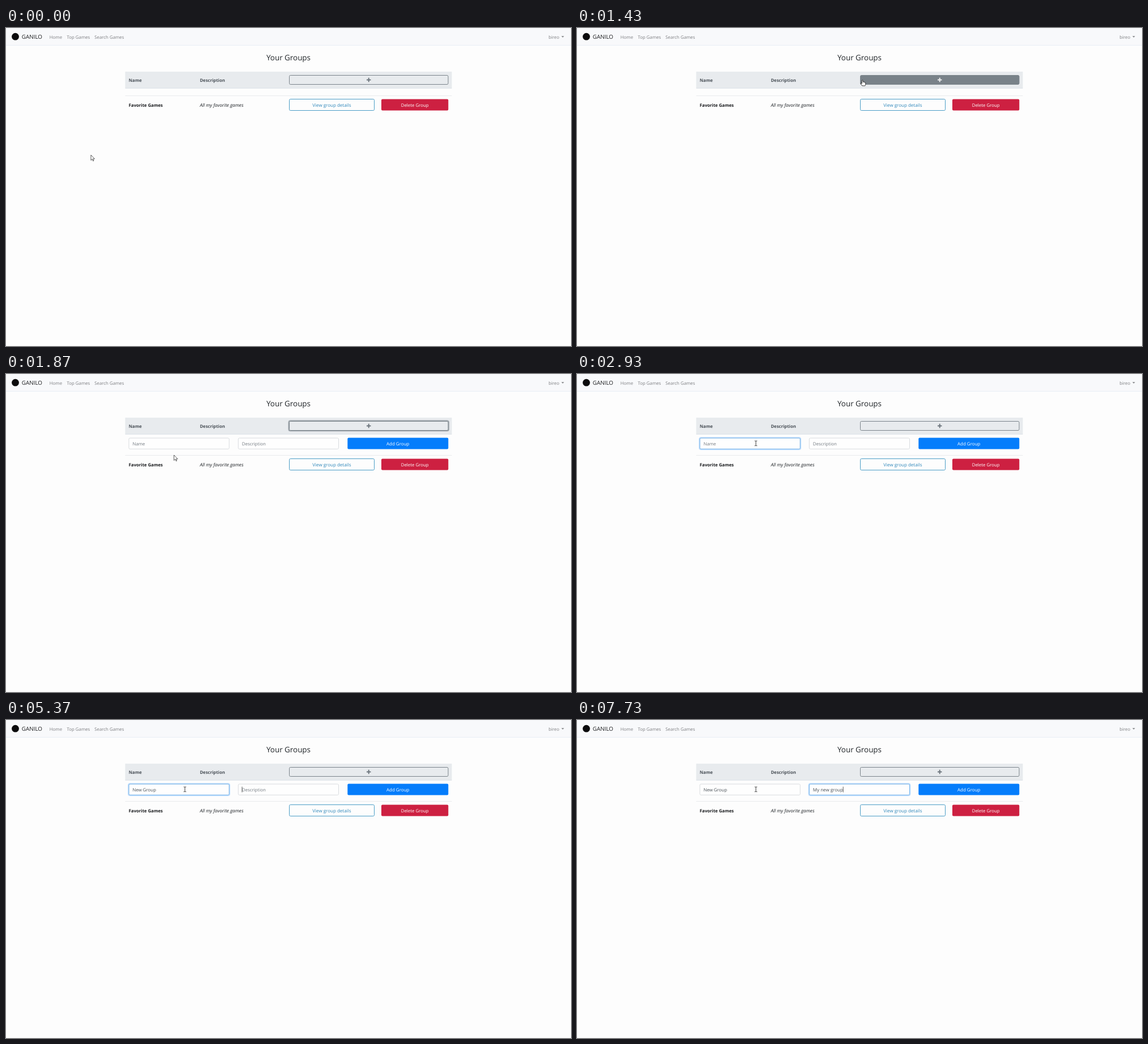
These frames come from a looping animation (998 by 561 pixels, 8 s). An HTML page:

```html
<!DOCTYPE html>
<html lang="en">
<head>
<meta charset="utf-8">
<title>Your Groups</title>
<style>
html, body { margin: 0; width: 100%; height: 100%; overflow: hidden; background: #fdfdfd; }
svg { display: block; width: 998px; height: 561px; }
text { font: 7.87px "Open Sans", "Noto Sans", sans-serif; fill: #212529; text-rendering: geometricPrecision; white-space: pre; }
.mid { text-anchor: middle; }
.nav { fill: #7e7f82; }
.brand { font-size: 9.9px; fill: #18191b; }
.title { font-size: 13.4px; }
.head { font-size: 7.72px; font-weight: 700; fill: #495057; }
.bold { font-size: 7.72px; font-weight: 700; fill: #17191c; }
.note { font-size: 8.2px; font-style: italic; }
.wide { font-size: 8px; }
.info { fill: #3088bb; }
.white { fill: #fff; }
.hint { fill: #747b82; }
.typed { fill: #495057; }
.outline { fill: none; stroke-width: 1; }
.ring { fill: none; stroke-width: 1.7; opacity: 0; }
</style>
</head>
<body>
<svg viewBox="0 0 998 561">
  <defs><clipPath id="fold"><rect id="foldBox" x="205" y="106" width="590" height="0"/></clipPath></defs>

  <rect width="998" height="30" fill="#f8f9fb"/>
  <rect y="30" width="998" height="1" fill="#e9eff6"/>
  <circle cx="16.5" cy="15.2" r="6.4" fill="#0b0b0c"/>
  <text class="brand" x="27.8" y="19.2">GANILO</text>
  <text class="nav" x="76.8" y="18.7">Home</text>
  <text class="nav" x="107.4" y="18.7">Top Games</text>
  <text class="nav" x="156.2" y="18.7">Search Games</text>
  <text class="nav" x="977.2" y="18.7" text-anchor="end">bireo</text>
  <path d="M981 14.2h4.8l-2.4 2.5z" fill="#7e7f82"/>

  <text class="title mid" x="499" y="56.8">Your Groups</text>

  <rect x="210.5" y="77" width="577" height="29" fill="#e8ebee"/>
  <rect x="210.5" y="105.7" width="577" height="1" fill="#d9e0e6"/>
  <text class="head" x="216.8" y="94.5">Name</text>
  <text class="head" x="342.4" y="94.5">Description</text>
  <rect id="plusRing" class="ring" x="499.3" y="82.3" width="282.8" height="18.2" rx="3" stroke="#6c757d"/>
  <rect id="plusFill" x="500.5" y="83.5" width="280.5" height="16" rx="2" fill="#6c757d"/>
  <rect class="outline" x="500.5" y="83.5" width="280.5" height="16" rx="2" stroke="#7b848b"/>
  <path id="plusDark" d="M637 91.5h7.4M640.7 87.8v7.4" stroke="#6c757d" stroke-width="1.9"/>
  <path id="plusLight" d="M637 91.5h7.4M640.7 87.8v7.4" stroke="#fff" stroke-width="1.9"/>

  <g clip-path="url(#fold)">
    <g id="fields"></g>
    <rect x="603.3" y="112.6" width="178" height="20" rx="2" fill="#057dfb"/>
    <text class="wide white mid" x="692.2" y="125.6">Add Group</text>
  </g>

  <g id="row">
    <rect x="210.5" y="119" width="577" height="1" fill="#e9ebed"/>
    <text class="bold" x="216.8" y="138.6">Favorite Games</text>
    <text class="note" x="342.4" y="138.6">All my favorite games</text>
    <rect class="outline" x="500.5" y="125.5" width="150" height="20" rx="2" stroke="#4a9dc6"/>
    <text class="wide info mid" x="575.4" y="138.6">View group details</text>
    <rect x="663" y="125.4" width="118.3" height="20" rx="2" fill="#cd2041"/>
    <text class="white mid" x="722.2" y="138.6">Delete Group</text>
  </g>

  <g id="pointer">
    <path id="arrow" d="M0 0V9.4L2.2 7.4L3.8 10.7L5.1 10.1L3.6 6.9H6.6Z" fill="#fff" stroke="#333" stroke-width=".8"/>
    <path id="hand" d="M-1.2 .6Q-.2 -.6 .8 .6V3.3Q2 2.7 2.5 3.7Q3.6 3.2 4.1 4.2Q5.2 4 5.3 5.2V7.4Q5.2 8.6 4.4 10H-.6Q-2.6 7.9 -3.5 5.8Q-3 4.6 -1.2 6.1Z" fill="#fff" stroke="#222" stroke-width=".9"/>
    <path id="beam" d="M-2.2 -4.3Q-.4 -4.5 0 -3.6Q.4 -4.5 2.2 -4.3M0 -3.6V3.6M-2.2 4.3Q-.4 4.5 0 3.6Q.4 4.5 2.2 4.3" fill="none" stroke="#333" stroke-width=".95"/>
  </g>
</svg>
<script>
const LOOP = 8000, FADE = 150, BLINK = 530;
const FORM_HEIGHT = 24;
const HOVER_IN = 1340, OPEN = 1510, HOVER_OUT = 1690, FOCUS = 2400, TAB = 5370;

const $ = id => document.getElementById(id);
const clamp = v => Math.min(1, Math.max(0, v));
const mix = (a, b, k) => a + (b - a) * k;
const show = (el, on) => el.setAttribute('opacity', +on);

// The standard "ease" curve: cubic-bezier(.25, .1, .25, 1)
function ease(x) {
  if (x <= 0 || x >= 1) return clamp(x);
  const curve = (a, b, u) => 3 * a * u * (1 - u) ** 2 + 3 * b * u * u * (1 - u) + u ** 3;
  let lo = 0, hi = 1;
  for (let i = 0; i < 20; i++) {
    const u = (lo + hi) / 2;
    if (curve(.25, .25, u) < x) lo = u; else hi = u;
  }
  return curve(.1, 1, lo);
}
const fade = (t, start, length = FADE) => ease((t - start) / length);
const pulse = (t, start, end) => fade(t, start) * (1 - fade(t, end));

// Pointer stops: time, x, y
const path = [
  [30, 150, 224], [930, 327, 155], [1360, 503, 95], [1500, 505.8, 89],
  [1660, 505.8, 89], [1870, 296.7, 143], [2350, 316, 122.3]
];
function pointerAt(t) {
  if (t <= path[0][0]) return path[0].slice(1);
  const i = path.findIndex(p => p[0] > t);
  if (i < 0) return path[path.length - 1].slice(1);
  const [a, b] = [path[i - 1], path[i]];
  const u = (t - a[0]) / (b[0] - a[0]);
  const k = u * u * (3 - 2 * u);
  return [mix(a[1], b[1], k), mix(a[2], b[2], k)];
}

const fields = [
  { x: 217, hint: 'Name', text: 'New Group', size: 7.87, from: FOCUS, to: TAB,
    keys: [3470, 3530, 3630, 3770, 4030, 4300, 4430, 4570, 4800] },
  { x: 410.3, hint: 'Description', text: 'My new group', size: 8.02, from: TAB, to: LOOP + FADE,
    keys: [6500, 6570, 6670, 6770, 6830, 6930, 7030, 7130, 7270, 7300, 7500, 7630] }
];

function add(tag, attrs) {
  const el = document.createElementNS('http://www.w3.org/2000/svg', tag);
  for (const name in attrs) el.setAttribute(name, attrs[name]);
  return $('fields').appendChild(el);
}

for (const f of fields) {
  const box = { x: f.x, y: 113, width: 177.2, height: 19.3, rx: 2 };
  f.ring = add('rect', { ...box, x: f.x - 1, y: 112, width: 179.2, height: 21.3, rx: 3, class: 'ring', stroke: '#bfdeff' });
  add('rect', { ...box, fill: '#fefefe', stroke: '#d9dcdf' });
  f.edge = add('rect', { ...box, class: 'outline', stroke: '#72b5f0' });
  f.label = add('text', { x: f.x + 6.5, y: 125.7 });
  f.caret = add('rect', { y: 117.6, width: .8, height: 10, fill: '#333' });
}

function drawField(f, t) {
  const typed = f.keys.filter(k => k <= t);
  const focus = pulse(t, f.from, f.to);
  f.ring.style.opacity = focus;
  show(f.edge, 0);
  f.edge.setAttribute('opacity', focus);
  f.label.textContent = typed.length ? f.text.slice(0, typed.length) : f.hint;
  f.label.setAttribute('class', typed.length ? 'typed' : 'hint');
  f.label.style.fontSize = (typed.length ? f.size : 7.87) + 'px';
  const since = t - (typed.length ? typed[typed.length - 1] : f.from);
  const active = t >= f.from && t < f.to;
  show(f.caret, active && Math.floor(since / BLINK) % 2 === 0);
  const width = typed.length ? f.label.getComputedTextLength() : 0;
  f.caret.setAttribute('x', f.x + 6.3 + width);
}

function drawPointer(t) {
  const [x, y] = pointerAt(t);
  const hand = t >= HOVER_IN && t < HOVER_OUT;
  const beam = t > 1870 && x > 217 && x < 394 && y > 113 && y < 132.5;
  $('pointer').setAttribute('transform', `translate(${x} ${y})`);
  show($('hand'), hand);
  show($('beam'), beam);
  show($('arrow'), !hand && !beam);
}

function draw(t) {
  const hover = pulse(t, HOVER_IN, HOVER_OUT);
  show($('plusFill'), 0);
  $('plusFill').setAttribute('opacity', hover);
  $('plusLight').setAttribute('opacity', hover);
  $('plusDark').setAttribute('opacity', 1 - hover);
  $('plusRing').style.opacity = .6 * pulse(t, OPEN - 60, FOCUS);

  const open = FORM_HEIGHT * fade(t, OPEN, 350);
  $('foldBox').setAttribute('height', open ? 6.6 + open : 0);
  $('row').setAttribute('transform', `translate(0 ${open})`);

  fields.forEach(f => drawField(f, t));
  drawPointer(t);
}

const start = performance.now();
function tick() {
  draw((performance.now() - start) % LOOP);
  requestAnimationFrame(tick);
}
tick();
</script>
</body>
</html>
```
